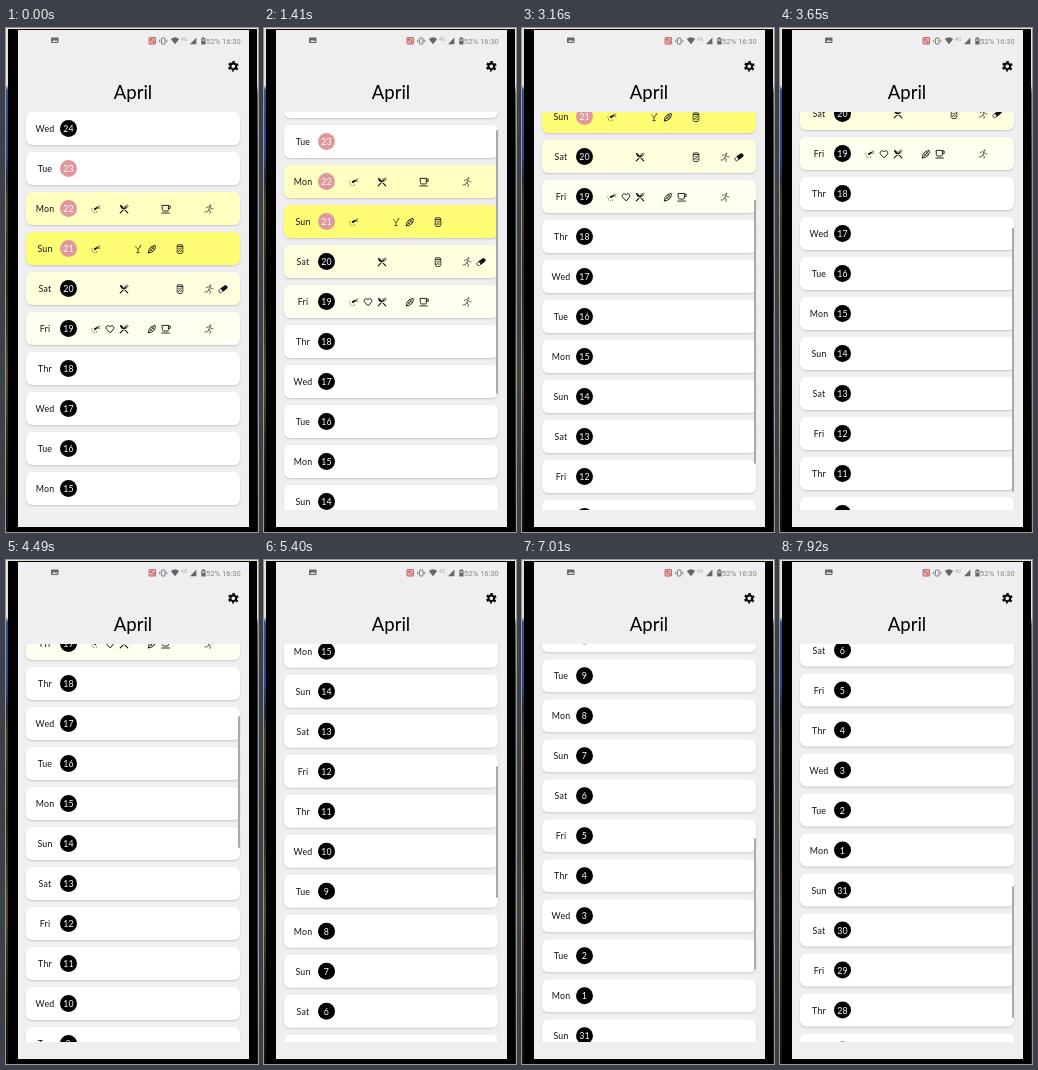
Write an HTML page that moves like this. It is 252x504 px and loops after 7.99 s.

```html
<!DOCTYPE html>
<html lang="en">
<head>
<meta charset="utf-8">
<title>April</title>
<style>
html, body { margin: 0; width: 100%; height: 100%; overflow: hidden; background: #000; }
#stage { position: relative; width: 252px; height: 504px; overflow: hidden; font-family: Lato, "Open Sans", sans-serif; color: #111; }
#stage * { position: absolute; box-sizing: border-box; }
.edge { top: 0; width: 2px; height: 504px; }
#sky { left: 0; top: 0; width: 252px; height: 1px; background: #e4e2d2; }
#left { left: 0; background: linear-gradient(#e4e2d2 57px, #32518f 62px, #2b478a 125px, #232d3c 150px, #4a4018 175px, #2b290f 260px, #57481a 350px, #29230d 430px, #15130a); }
#right { right: 0; width: 1px; background: linear-gradient(#e4e2d2 57px, #59635c 65px, #39423a 140px, #3d3719 260px, #4c411b 350px, #1e1b0d); }
#screen { left: 12px; top: 2px; width: 230.5px; height: 497px; background: #efeef0; }
#title { left: 12px; width: 230px; top: 53.3px; line-height: 22px; font-size: 18.5px; text-align: center; color: #000; }
#list { left: 12px; top: 84px; width: 230px; height: 398px; overflow: hidden; }
#rows { left: 8px; top: 0; width: 214px; }
.row { left: 0; width: 214px; height: 33px; border-radius: 6px; background: #fff; box-shadow: 0 1px 2px rgba(0, 0, 0, .17); line-height: 33px; font-size: 8.8px; letter-spacing: .2px; text-align: center; }
.day { left: 4px; width: 30px; }
.num { left: 34px; top: 8px; width: 17px; height: 17px; line-height: 17px; border-radius: 50%; background: #000; color: #fff; }
.pink { background: #e1989c; }
.row svg { top: 11.5px; width: 10px; height: 10px; overflow: visible; }
#thumb { left: 220px; width: 2px; border-radius: 1px; background: #a9a9a9; }
#bar { left: 0; top: 0; }
</style>
</head>
<body>
<div id="stage">
  <div id="sky"></div>
  <div id="left" class="edge"></div>
  <div id="right" class="edge"></div>
  <div id="screen"></div>
  <svg id="bar" width="252" height="60" font-family="Roboto, sans-serif" fill="#858585">
    <rect x="45" y="9.5" width="7.5" height="5.6" rx=".8" fill="#666"/>
    <path d="M46 14l2-2.2 1.5 1.3 1-1 1.3 1.9z" fill="#ddd"/>
    <rect x="143" y="9.5" width="6.6" height="6.6" rx=".6" fill="#e3a9a8" stroke="#b9605f" stroke-width=".9"/>
    <path d="M144.6 11h1.6v1.6h-1.6zM146.9 13.2h1.4v1.4h-1.4z" fill="#a04a49"/>
    <rect x="155.4" y="10" width="3.6" height="6" rx=".7" fill="none" stroke="#777"/>
    <path d="M153.6 11.8v2.4M160.8 11.8v2.4" stroke="#777" stroke-width=".9"/>
    <path d="M164.8 11.1q4.2-3.5 8.4 0L169 16.2z" fill="#666"/>
    <text x="174.8" y="13" font-size="5.4" fill="#aaa">4G</text>
    <path d="M184 16.2h6.4V9.6z" fill="#666"/>
    <path d="M195.3 10.3h1.2v-1h1.8v1h1.2v6.3h-4.2z" fill="#666"/>
    <path d="M196.3 11.3h2.2v1.6h-2.2z" fill="#ddd"/>
    <text x="199.8" y="15.7" font-size="7.8">52%</text>
    <text x="216" y="15.7" font-size="7.5">16:30</text>
    <g fill="none" stroke="#000" transform="translate(227.3 38.3)">
      <circle r="2.9" stroke-width="2.1"/>
      <circle r="4.5" stroke-width="1.6" stroke-dasharray="2.5 2.212" stroke-dashoffset="1.25" transform="rotate(90)"/>
    </g>
  </svg>
  <div id="title">April</div>
  <div id="list"><div id="rows"></div><div id="thumb"></div></div>
</div>
<script>
const PITCH = 40, VIEW = 398, LOOP = 7990, STEP = 70, START = 500;
const days = ['Wed', 'Tue', 'Mon', 'Sun', 'Sat', 'Fri', 'Thr'];

const line = (d, w = 0.9) => `<path d="${d}" fill="none" stroke="#111" stroke-width="${w}" stroke-linecap="round" stroke-linejoin="round"/>`;
const solid = d => `<path d="${d}" fill="#111"/>`;

// Icons on a 10 x 10 grid, in column order
const icons = [
  solid('M2.8 4.4L6.4 2.8 7.4 4 5.4 5 4.4 6.2 3 5.6z') + line('M6.6 3L9 1.8M7.2 4l1.8.2', .6) + line('M.8 4.8h.1M1.4 7h.1M3 8.6h.1M5.4 8h.1', .8),
  line('M5 8.6L1.7 5.3C-.2 3 3 .2 5 2.8 7 .2 10.2 3 8.3 5.3z', 1),
  line('M3.4 3.4L8.8 8.9M1.2 8.9L6.6 3.5', 1.1) + solid('M.8.8q3 .6 3.8 3.2L3.2 5.2Q1 3.6.8.8z') + line('M5.8 2.8Q5.6 4.4 7.2 4.2L9.2 2.4M6.8 3.4L8.6 1.6M5.8 2.8L7.8.8', .7),
  line('M2.4 2.6L5 5.4 7.4 2.6M5 5.4v3M3.8 8.6h2.4M6.6 2.8L8 1.2', .7),
  line('M1.4 8.8Q1.2 4.6 4 3L8 1.2Q9.2 3.6 7 6.4 4.6 9 1.4 8.8z', .9) + line('M3.4 5l1.8 1.8M5 3.6l1.8 1.6M3 7.2L6.8 3', .8),
  line('M1.4 1.4h6v4.4q0 1.2-1.2 1.2H2.6Q1.4 7 1.4 5.8zM7.4 2h1.8v2.4H7.4M.8 9h7.6', .9),
  line('M3 .8h4l.8 1.2v6.4L7 9.4H3l-.8-1V2z', .8) + line('M2.6 2.4h4.8M3.4 7.6L6.6 3.8M3.8 4.6l.6-.6M5.6 7.6l1-.8', .9),
  '',
  '<circle cx="6.4" cy="1.5" r=".9" fill="#444"/>' + line('M2.4 3.6L4.4 2.6 6 3.4 4.6 6 6.4 7.2 6 9.4M4.6 6L3.4 7.8 1 8M6 3.4l1.2 1.4H9', .65),
  '<g transform="rotate(-36 5 5)"><rect x=".2" y="3.4" width="9.4" height="3.4" rx="1.7" fill="#fff" stroke="#111" stroke-width=".7"/><path d="M3.4 3.2h4.6a1.9 1.9 0 0 1 0 3.8H3.4z" fill="#111"/></g>'
];

// Rows with entries: day number -> [row colour, icon columns]
const entries = {
  22: ['#ffffbf', [0, 2, 5, 8]],
  21: ['#fffd73', [0, 3, 4, 6]],
  20: ['#ffffe0', [2, 6, 8, 9]],
  19: ['#fffff0', [0, 1, 2, 4, 5, 8]]
};

const rows = document.getElementById('rows'), thumb = document.getElementById('thumb');

rows.innerHTML = Array.from({ length: 30 }, (_, i) => {
  const n = i < 24 ? 24 - i : 55 - i;
  const [color, cols] = i < 24 && entries[n] || ['#fff', []];
  const pink = n > 20 && n < 24 && i < 24 ? ' pink' : '';
  const marks = cols.map(c => `<svg viewBox="0 0 10 10" style="left:${64.5 + c * 14.15}px">${icons[c]}</svg>`).join('');
  return `<div class="row" style="top:${i * PITCH}px;background:${color}">` +
    `<span class="day">${days[i % 7]}</span><span class="num${pink}">${n}</span>${marks}</div>`;
}).join('');

// Each fling: start, end, from, to, ease-out power
const flings = [
  [430, 2460, 0, 50, 1.18],
  [2460, 4210, 50, 202, 1.516],
  [4420, 6170, 202, 423, 1.72],
  [6380, 7080, 423, 590, 1.5],
  [7360, 7920, 590, 730.5, 1.2]
];

function scrollAt(t) {
  let y = 0;
  for (const [start, end, from, to, power] of flings) {
    if (t < start) break;
    const k = Math.min(1, (t - start) / (end - start));
    y = from + (to - from) * (1 - (1 - k) ** power);
  }
  return y;
}

function draw(now) {
  let t = now % LOOP;
  t = t < START ? 0 : START + Math.floor((t - START) / STEP) * STEP;
  const y = t ? scrollAt(t) : 0;
  const total = (t < 4490 ? 15 : 30) * PITCH; // more days load at the list's end
  rows.style.transform = `translateY(${-y}px)`;
  thumb.style.display = t ? 'block' : 'none';
  thumb.style.top = y * VIEW / total + 'px';
  thumb.style.height = VIEW * VIEW / total + 'px';
}

let origin;
function tick(now) {
  origin ??= now;
  draw(now - origin);
  requestAnimationFrame(tick);
}
draw(0);
requestAnimationFrame(tick);
</script>
</body>
</html>
```
